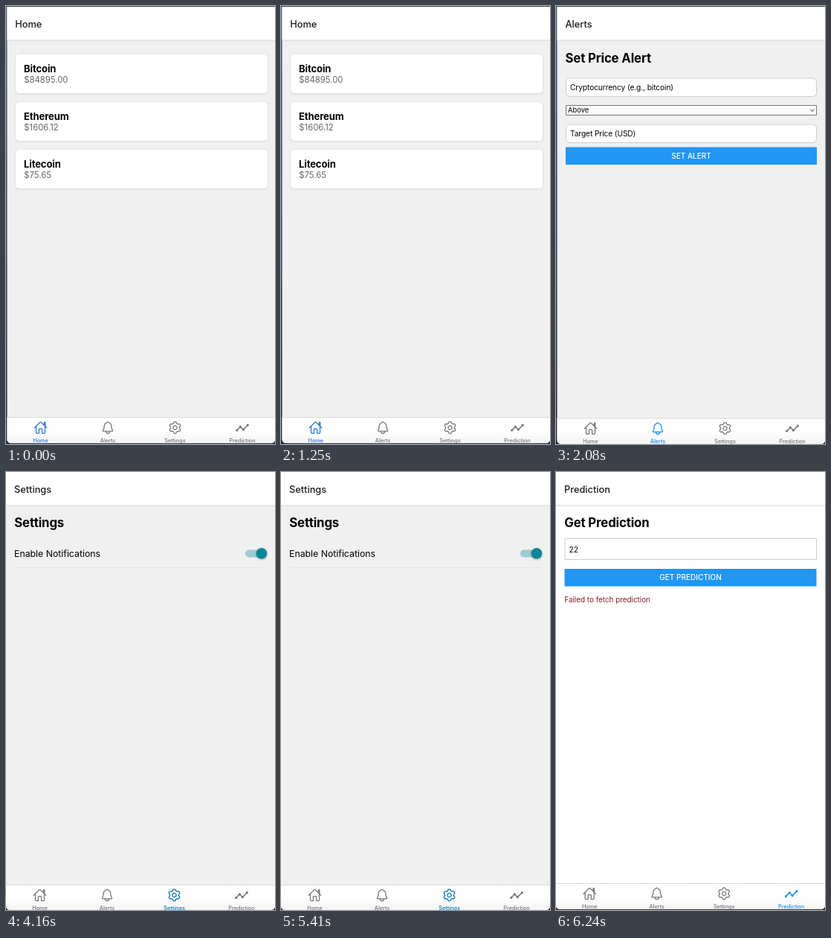
Animation, 362 px wide and 588 px high, one loop 8.32 s. Source, as an HTML page with a canvas:

```html
<!DOCTYPE html>
<html lang="en">
<head>
<meta charset="utf-8">
<title>Crypto app tour</title>
<style>
html, body { margin: 0; width: 100%; height: 100%; overflow: hidden; background: #fff; }
canvas { display: block; width: 362px; height: 588px; }
</style>
</head>
<body>
<canvas id="stage"></canvas>
<script>
const W = 362, H = 588, HOLD = 2080;
const canvas = document.getElementById('stage');
const dpr = window.devicePixelRatio || 1;
canvas.width = W * dpr;
canvas.height = H * dpr;
const ctx = canvas.getContext('2d');
ctx.scale(dpr, dpr);

const BLUE = '#2196f3';
const PALE = '#f0f0f0';

function text(str, x, y, size, { weight = 400, color = '#000', align = 'left', spacing = 0 } = {}) {
  ctx.font = `${weight} ${size}px Inter, "Open Sans", sans-serif`;
  ctx.letterSpacing = spacing + 'px';
  ctx.textAlign = align;
  ctx.fillStyle = color;
  ctx.fillText(str, x, y);
}

function rect(x, y, w, h, color) {
  ctx.fillStyle = color;
  ctx.fillRect(x, y, w, h);
}

function box(x, y, w, h, r, fill, border) {
  ctx.beginPath();
  ctx.roundRect(x, y, w, h, r);
  ctx.fillStyle = fill;
  ctx.fill();
  if (border) {
    ctx.strokeStyle = border;
    ctx.lineWidth = 1;
    ctx.stroke();
  }
}

function disc(x, y, r, color) {
  ctx.beginPath();
  ctx.arc(x, y, r, 0, Math.PI * 2);
  ctx.fillStyle = color;
  ctx.fill();
}

function shadow(color, blur, dy) {
  ctx.shadowColor = color;
  ctx.shadowBlur = blur * dpr;
  ctx.shadowOffsetY = dy * dpr;
}

// Icons are drawn around the origin in the current stroke colour.
const icons = {
  Home() {
    ctx.stroke(new Path2D('M-8.2 .2 L-.6 -7.2 Q0 -7.7 .6 -7.2 L8.2 .2 M4.9 -3 V-7 H6.3 V-1.7' +
      'M-6 -1.8 V6.6 Q-6 7.6 -5 7.6 H-2.1 V2.4 Q-2.1 1.6 -1.3 1.6 H1.3 Q2.1 1.6 2.1 2.4 V7.6 H5 Q6 7.6 6 6.6 V-1.8'));
  },
  Alerts() {
    ctx.stroke(new Path2D('M0 -7.6 C-1 -7.6 -1.5 -7 -1.7 -6.4 C-4.2 -5.6 -4.9 -3.4 -4.9 -1.2 C-4.9 2.4 -6.6 2.8 -6.6 4.2' +
      'Q-6.6 4.8 -5.9 4.8 H5.9 Q6.6 4.8 6.6 4.2 C6.6 2.8 4.9 2.4 4.9 -1.2 C4.9 -3.4 4.2 -5.6 1.7 -6.4 C1.5 -7 1 -7.6 0 -7.6 Z' +
      'M-2.5 4.9 V5.3 A2.5 2.5 0 0 0 2.5 5.3 V4.9'));
  },
  Settings() {
    ctx.beginPath();
    for (let i = 0; i < 120; i++) {
      const a = i * Math.PI / 60;
      const r = 6.9 + 0.95 * Math.tanh(2.2 * Math.cos(6 * a));
      ctx.lineTo(r * Math.sin(a), -r * Math.cos(a));
    }
    ctx.closePath();
    ctx.stroke();
    ctx.beginPath();
    ctx.arc(0, 0, 2.6, 0, Math.PI * 2);
    ctx.stroke();
  },
  Prediction(color) {
    const points = [[-7.3, 3.6], [-2.6, -1.2], [1.3, 2.7], [7.3, -3.3]];
    ctx.lineWidth = 1.6;
    ctx.beginPath();
    points.forEach(p => ctx.lineTo(...p));
    ctx.stroke();
    points.forEach(([x, y]) => disc(x, y, 1.6, color));
  }
};

function tabBar({ name, top, x, active, idle }) {
  const fade = ctx.createLinearGradient(0, top, 0, H);
  fade.addColorStop(0, '#fff');
  fade.addColorStop(0.6, '#fdfdfd');
  fade.addColorStop(1, '#f3f3f4');
  rect(0, top, W, H - top, fade);
  rect(0, top, W, 1, '#dcdcdd');
  Object.keys(icons).forEach((tab, i) => {
    const color = tab === name ? active : idle;
    const cx = x + i * 90.5;
    ctx.save();
    ctx.translate(cx, top + 14);
    ctx.strokeStyle = color;
    ctx.lineWidth = 1.3;
    ctx.lineCap = ctx.lineJoin = 'round';
    icons[tab](color);
    ctx.restore();
    text(tab, cx, top + 33.8, 7.3, { weight: 500, color, align: 'center' });
  });
}

function heading(str, x, y) {
  text(str, x, y, 16.8, { weight: 700, spacing: -0.15 });
}

function button(label, x, y, w, h) {
  rect(x, y, w, h, BLUE);
  text(label, x + w / 2, y + h / 2 + 3.7, 10, { weight: 500, color: '#fff', align: 'center' });
}

function home() {
  const coins = [['Bitcoin', '$84895.00'], ['Ethereum', '$1606.12'], ['Litecoin', '$75.65']];
  coins.forEach(([coin, price], i) => {
    const y = 65 + i * 64;
    ctx.save();
    shadow('rgba(0,0,0,.13)', 3, 0.8);
    box(13, y, 339, 52, 5, '#fff');
    ctx.restore();
    text(coin, 24, y + 24, 13, { weight: 700, spacing: -0.1 });
    text(price, 24.3, y + 38, 11.3, { color: '#666' });
  });
}

function alerts() {
  heading('Set Price Alert', 12.5, 75.5);
  box(13.5, 97, 337, 24.5, 5, '#fff', '#ccc');
  text('Cryptocurrency (e.g., bitcoin)', 19, 113, 10.2, { spacing: -0.1 });
  box(13.5, 133.5, 337, 13, 0, '#fafafa', '#777');
  text('Above', 16, 143.4, 9.4);
  ctx.lineWidth = 1;
  ctx.strokeStyle = '#333';
  ctx.stroke(new Path2D('M342.3 138.7 L345 141.4 L347.7 138.7'));
  box(13.5, 159, 337, 24.5, 5, '#fff', '#ccc');
  text('Target Price (USD)', 19, 175, 10.2, { spacing: -0.1 });
  button('SET ALERT', 13, 189.5, 338, 23.5);
}

function settings() {
  heading('Settings', 11.2, 74.3);
  text('Enable Notifications', 11, 114, 12.3);
  box(322, 104.5, 27, 10, 5, '#9ccad3');
  ctx.save();
  shadow('rgba(0,0,0,.35)', 2.5, 1);
  disc(344, 109.3, 7.3, '#0b8599');
  ctx.restore();
  rect(12, 128, 340, 1, '#e6e6e7');
}

function prediction() {
  heading('Get Prediction', 11.2, 74);
  box(12, 89.5, 338.5, 28, 0, '#fff', '#ccc');
  text('22', 17.5, 107.7, 10.2);
  button('GET PREDICTION', 11.5, 130, 339, 23.5);
  text('Failed to fetch prediction', 11.3, 174.8, 9.9, { color: '#8b1a1a' });
}

const screens = [
  { name: 'Home', body: home, bg: PALE, left: 1.5, top: 1, bottom: 587, line: 46, titleX: 12.2, titleY: 29,
    tabs: 552, x: 46.5, active: '#2f78d2', idle: '#77777b', edge: ['#3f628f', '#1d2c40'] },
  { name: 'Alerts', body: alerts, bg: PALE, left: 1.5, top: 1, bottom: 588, line: 46, titleX: 12.5, titleY: 29,
    tabs: 553, x: 46.5, active: '#1b8ceb', idle: '#77777b', edge: ['#35557f', '#16253a'] },
  { name: 'Settings', body: settings, bg: PALE, left: 0, top: 0, bottom: 588, line: 45, titleX: 11, titleY: 27.7,
    tabs: 554, x: 45.5, active: '#0b74b8', idle: '#77777b', edge: ['#222', '#222'] },
  { name: 'Prediction', body: prediction, bg: '#fff', left: 0, top: 0, bottom: 587, line: 45, titleX: 11, titleY: 27.7,
    tabs: 552, x: 45.2, active: '#2590ea', idle: '#7b7478', edge: ['#3a2a2c', '#3a2a2c'] }
];

function drawScreen(s) {
  const edge = ctx.createLinearGradient(0, 0, 0, H);
  edge.addColorStop(0, s.edge[0]);
  edge.addColorStop(1, s.edge[1]);
  rect(0, 0, W, H, edge);
  if (s.top) rect(0, 0, W, s.top, '#3b3f45');

  ctx.save();
  ctx.beginPath();
  ctx.roundRect(s.left, s.top, W - s.left, s.bottom - s.top, [0, 0, 5, 5]);
  ctx.clip();
  rect(0, 0, W, H, s.bg);
  rect(0, 0, W, s.line, '#fff');
  rect(0, s.line - 0.5, W, 1, '#d8d8d9');
  text(s.name, s.titleX, s.titleY, 12.8, { weight: 500, color: '#1c1c1e' });
  s.body();
  tabBar({ ...s, top: s.tabs });
  ctx.restore();
}

function frame() {
  const step = Math.floor(performance.now() / HOLD) % screens.length;
  drawScreen(screens[step]);
  requestAnimationFrame(frame);
}
frame();
</script>
</body>
</html>
```
